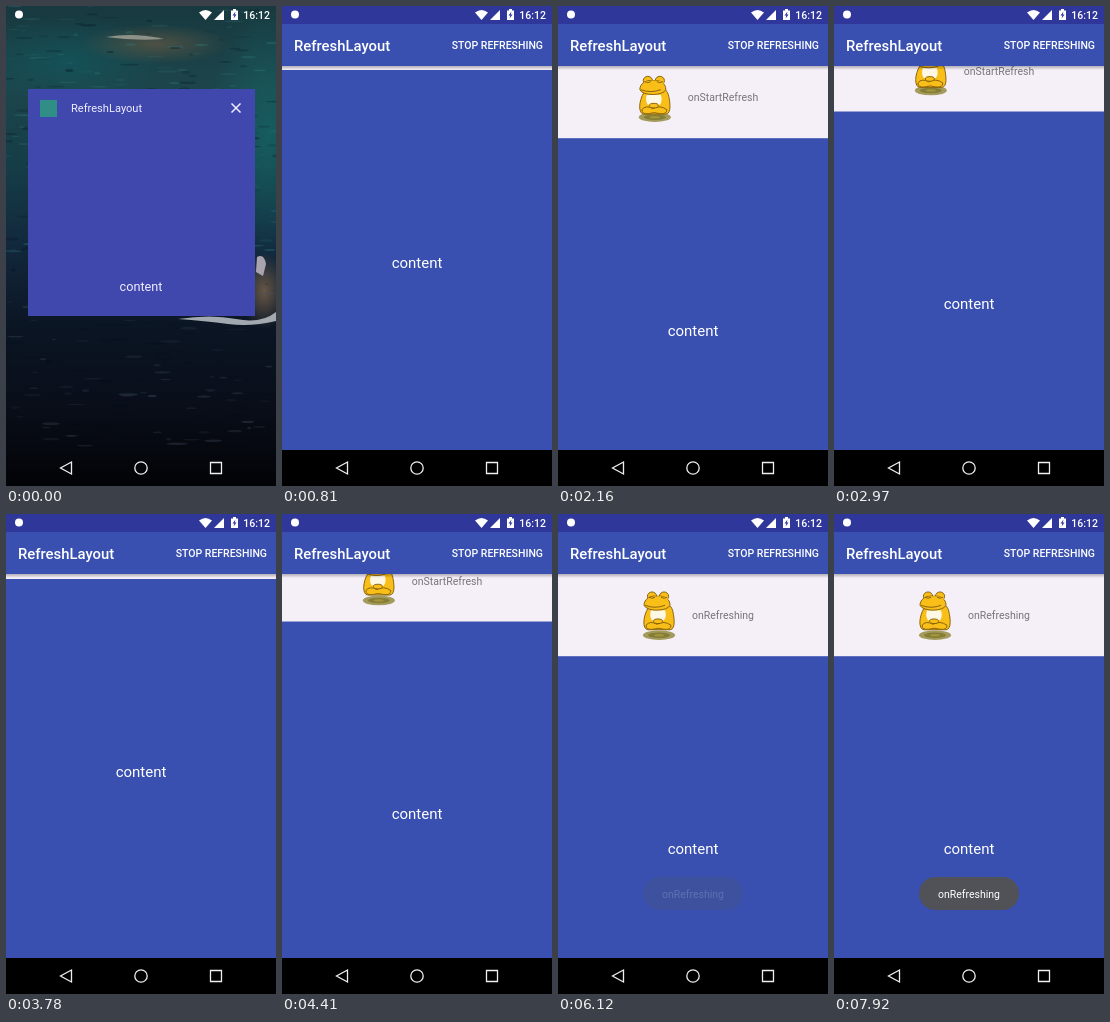
An HTML page with a canvas that plays this animation: 270 px wide and 480 px high, repeating every 8000 ms.

```html
<!DOCTYPE html>
<html>
<head>
<meta charset="utf-8">
<style>
  html, body { margin: 0; width: 100%; height: 100%; overflow: hidden; background: #000; }
  canvas { display: block; width: 270px; height: 480px; }
</style>
</head>
<body>
<canvas id="stage" width="270" height="480"></canvas>
<script>
const ctx = document.getElementById('stage').getContext('2d');
const LOOP = 8000, STEP = 90, BAR = 60, NAV = 444;
const OPEN_AT = 45, OPEN_FOR = 405, REFRESH_AT = 6030;
const BLUE = '#3950b0', OUTLINE = '#8a6510', YELLOW = '#f9be17';

// Pull distance: [time, px]
const PULL = [[700, 0], [810, 4], [2160, 72.4], [2480, 77], [3600, 0], [3780, 5],
              [5040, 90.4], [5350, 94], [5700, 92], [6000, 82.4]];

const clamp = v => Math.max(0, Math.min(1, v));
const mix = (a, b, k) => a + (b - a) * k;
const smooth = k => k * k * (3 - 2 * k);

function pullAt(t) {
  if (t <= PULL[0][0]) return 0;
  for (let i = 1; i < PULL.length; i++) {
    const [t0, a] = PULL[i - 1], [t1, b] = PULL[i];
    if (t <= t1) return mix(a, b, smooth((t - t0) / (t1 - t0)));
  }
  return PULL[PULL.length - 1][1];
}

function seeded(seed) {
  return () => (seed = seed * 16807 % 2147483647) / 2147483647;
}

function rect(x, y, w, h, fill) {
  ctx.fillStyle = fill;
  ctx.fillRect(x, y, w, h);
}

function text(s, x, y, size, fill, align = 'center', weight = 400) {
  ctx.font = `${weight} ${size}px Roboto, sans-serif`;
  ctx.textAlign = align;
  ctx.textBaseline = 'alphabetic';
  ctx.fillStyle = fill;
  ctx.fillText(s, x, y + size * 0.35);
}

function ellipse(x, y, rx, ry, fill, stroke) {
  const p = new Path2D();
  p.ellipse(x, y, rx, ry, 0, 0, Math.PI * 2);
  shape(p, fill, stroke);
}

function shape(d, fill, stroke, width = 1) {
  const p = new Path2D(d);
  if (fill) { ctx.fillStyle = fill; ctx.fill(p); }
  if (stroke) { ctx.strokeStyle = stroke; ctx.lineWidth = width; ctx.stroke(p); }
}

function faded(alpha, draw) {
  ctx.save();
  ctx.globalAlpha *= alpha;
  draw();
  ctx.restore();
}

// Soft round patch of colour
function glow(x, y, rx, ry, rgb, alpha) {
  ctx.save();
  ctx.translate(x, y);
  ctx.scale(rx, ry);
  const g = ctx.createRadialGradient(0, 0, 0, 0, 0, 1);
  g.addColorStop(0, `rgba(${rgb},${alpha})`);
  g.addColorStop(1, `rgba(${rgb},0)`);
  rect(-1, -1, 2, 2, g);
  ctx.restore();
}

function wallpaper() {
  const g = ctx.createLinearGradient(0, 0, 0, 480);
  ['#17393f', '#1c454b', '#153d48', '#12283c', '#0b1524', '#090e19', '#020306']
    .forEach((c, i) => g.addColorStop(i / 6, c));
  rect(0, 0, 270, 480, g);
  glow(60, 55, 100, 45, '16,92,98', 0.6);
  glow(262, 130, 60, 130, '22,104,104', 0.7);
  glow(150, 38, 75, 20, '112,92,66', 0.6);
  glow(258, 285, 24, 38, '112,92,72', 0.9);
  const rnd = seeded(11);
  for (let i = 0; i < 420; i++) {
    const y = rnd() * 440, light = rnd() < 0.5;
    const tint = y < 250 ? '50,125,125' : '70,84,104';
    ellipse(rnd() * 270, y, 2 + rnd() * 9, 0.5 + rnd(),
      `rgba(${light ? tint : '4,14,24'},${0.1 + rnd() * 0.25})`);
  }
  shape('M100 31Q128 26 158 33Q128 35 100 31Z', '#8d9188');
  shape('M251 251Q258 247 260 258L257 270L250 266Z', '#a9a4b0');
  shape('M172 313Q205 308 230 313T270 306V315Q245 321 222 318T172 313Z', '#a2a9b0');
}

function statusIcons() {
  ellipse(13, 8.5, 4, 4, '#fff');
  shape('M193 6.5Q199.5 1.5 206 6.5L199.5 14Z', '#fff');
  shape('M218 4V14H208Z', '#fff');
  shape('M225 4.5H227V3H230V4.5H232V14H225Z', '#fff');
  shape('M229.5 5.5L226.5 9.5H228.3L227.6 12.5L230.6 8.5H228.8Z', '#30379b');
  text('16:12', 264, 9, 10.5, '#fff', 'right', 500);
}

function navIcons() {
  shape('M65.5 456V468L54.5 462Z', null, '#eee', 1.3);
  ellipse(135, 462, 6.2, 6.2);
  shape('M141.2 462A6.2 6.2 0 1 1 128.8 462A6.2 6.2 0 1 1 141.2 462Z', null, '#eee', 1.3);
  shape('M204.5 456.5H215.5V467.5H204.5Z', null, '#eee', 1.3);
}

function frog(x, y, lift) {
  ctx.save();
  ctx.translate(x, y);
  ellipse(0, 19.5, 16, 4.8, '#a39b5c');
  ellipse(0, 19.5, 11, 2.8, '#857c38');
  ellipse(0, 19.5, 5, 1.2, '#a3953a');
  ctx.translate(0, 2 - 2.5 * lift);
  shape('M-11-7C-16 1-17 14-11 14.5H11C17 14 15 2 14-3C13-9 9-12 5-12Z', YELLOW, OUTLINE);
  shape('M-8-5H6Q8 1 5 5H-7Q-10 1-8-5Z', '#fff8e4');
  shape('M-13 10Q-9 5-2 9Q5 5 12 10Q12 15 5 14Q-1 12-6 14Q-13 15-13 10Z', YELLOW, OUTLINE);
  ellipse(-1, 6, 4.5, 2.3, YELLOW, OUTLINE);
  ellipse(-7, -19, 4.6, 4.3, YELLOW, OUTLINE);
  ellipse(5, -19, 4.6, 4.3, YELLOW, OUTLINE);
  shape('M-15-10C-15-16-9-20-2-19C6-20 11-16 11-10C9-4-12-3-15-10Z', YELLOW, OUTLINE);
  ellipse(-1, -16.5, 10, 2.6, YELLOW);
  shape('M-14-10Q-4-6 6-10M-10-18Q-7-16-4-18M2-18Q5-16 8-18', null, OUTLINE);
  ctx.restore();
}

function header(t, pull) {
  const y = BAR + pull - 40.7;
  const label = t >= REFRESH_AT ? 'onRefreshing'
    : pull >= 82 ? 'onReleaseToRefresh' : 'onStartRefresh';
  ctx.save();
  ctx.beginPath();
  ctx.rect(0, BAR, 270, pull);
  ctx.clip();
  rect(0, BAR, 270, pull, '#f5eff8');
  text(label, 165, y, 10.5, '#77757a');
  const lift = (1 + Math.cos((t - 765) / 900 * Math.PI * 2)) / 2;
  frog(132 - ctx.measureText(label).width / 2, y, lift);
  ctx.restore();
}

function bars() {
  const g = ctx.createLinearGradient(0, BAR, 0, BAR + 4);
  g.addColorStop(0, 'rgba(0,0,0,.27)');
  g.addColorStop(1, 'rgba(0,0,0,0)');
  rect(0, BAR, 270, 4, g);
  rect(0, 18, 270, 42, BLUE);
  rect(0, 0, 270, 18, '#30379b');
  rect(0, NAV, 270, 36, '#000');
  text('RefreshLayout', 12, 39.5, 14.85, '#fff', 'left', 500);
  text('STOP REFRESHING', 261, 39.5, 10.5, '#fff', 'right', 500);
}

function toast(t) {
  faded(clamp((t - REFRESH_AT) / 500), () => {
    const pill = new Path2D();
    pill.roundRect(85, 363, 100, 33, 16.5);
    shape(pill, '#515257');
    text('onRefreshing', 135, 380, 10.5, '#fff');
  });
}

function card(k) {
  const x = mix(22, 0, k), y = mix(83, 0, k);
  const w = mix(227, 270, k), h = mix(227, NAV, k);
  wallpaper();
  rect(x, y, w, h, `rgb(${mix(64, 57, k)},${mix(71, 80, k)},${mix(173, 176, k)})`);
  text('content', 135, mix(281, 252, k), mix(12.7, 15, k), '#eef');
  faded(1 - k, () => {
    rect(x + 12, y + 11, 17, 17, '#2f8f86');
    text('RefreshLayout', x + 43, y + 19.5, 11.1, '#eef', 'left');
    const cx = x + w - 19, cy = y + 19;
    shape(`M${cx - 4.5} ${cy - 4.5}l9 9m0-9l-9 9`, null, '#eef', 1.5);
  });
  faded(k, bars);
}

function app(t) {
  const pull = pullAt(t);
  rect(0, BAR, 270, NAV - BAR, BLUE);
  header(t, pull);
  text('content', 135, 252.4 + pull, 15, '#fff');
  bars();
  if (t >= REFRESH_AT) toast(t);
}

function frame(now) {
  const t = Math.floor(now % LOOP / STEP) * STEP;
  const k = smooth(clamp((t - OPEN_AT) / OPEN_FOR));
  if (k < 1) card(k); else app(t);
  statusIcons();
  navIcons();
  requestAnimationFrame(() => frame(performance.now() - start));
}

const start = performance.now();
frame(0);
</script>
</body>
</html>
```
